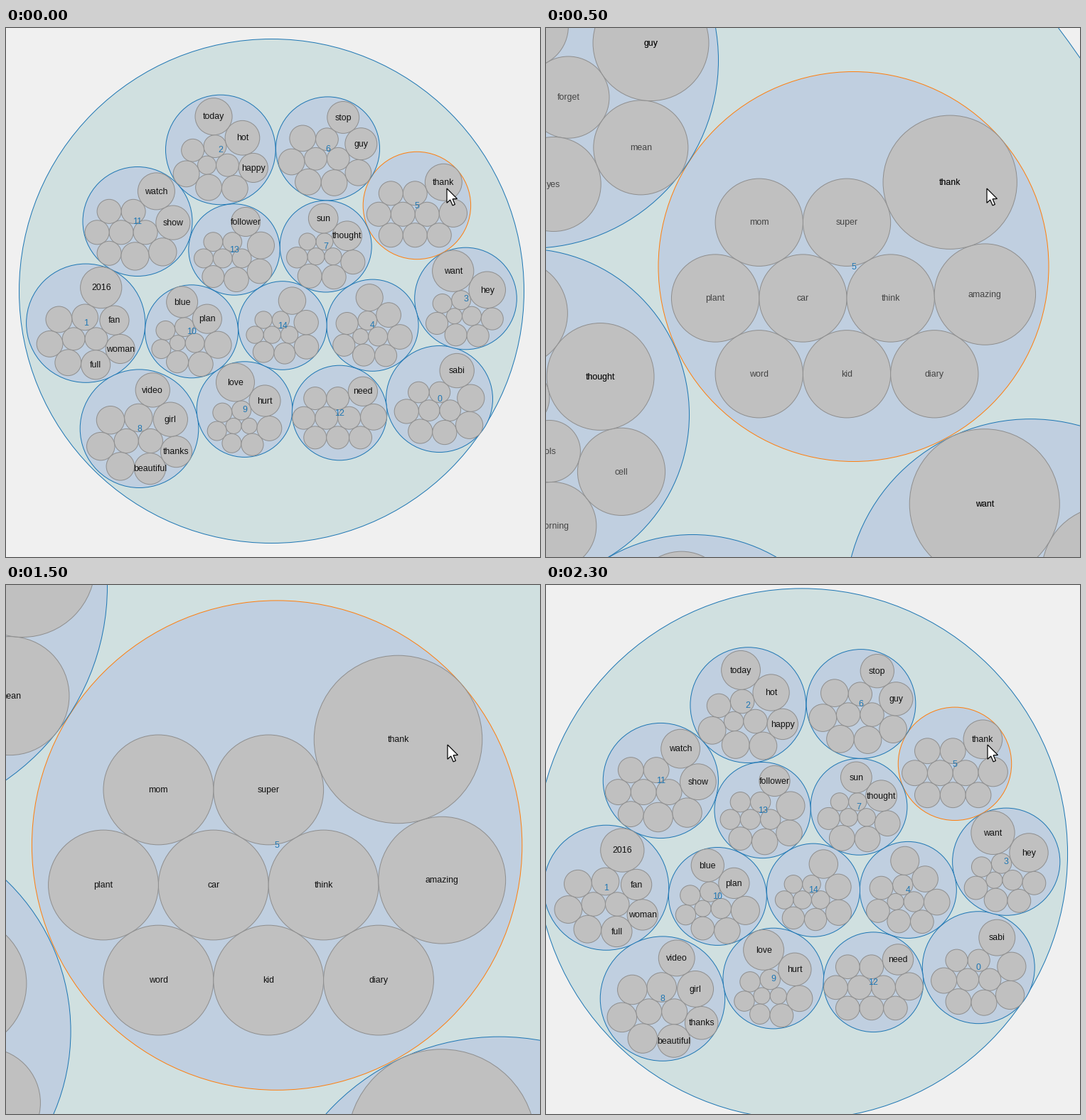
Recreate the animation shown at these times as a matplotlib script. Size 751 by 745 pixels, loop 2500 ms.

```python
import math

import matplotlib.pyplot as plt
from matplotlib.animation import FuncAnimation
from matplotlib.patches import Circle, Polygon

W, H, DPI = 751, 745, 64
PX = 72 / DPI  # points per pixel
BLUE, ORANGE = "#1f77b4", "#ff7f0e"
LABEL_MIN_R = 20
FOCUS = 5


class Leaf:
    def __init__(self, count, word):
        self.r = math.sqrt(count)
        self.word = word
        self.x = self.y = 0.0
        self.next = self.prev = self


def insert(a, b):
    after = a.next
    a.next, b.prev = b, a
    b.next, after.prev = after, b


def splice(a, b):
    a.next, b.prev = b, a


def overlaps(a, b):
    reach = a.r + b.r
    return 0.999 * reach * reach > (b.x - a.x) ** 2 + (b.y - a.y) ** 2


def place(a, b, c):
    """Put c tangent to both a and b."""
    dx, dy = b.x - a.x, b.y - a.y
    dc = dx * dx + dy * dy
    da, db = (b.r + c.r) ** 2, (a.r + c.r) ** 2
    x = 0.5 + (db - da) / (2 * dc)
    area = 2 * da * (db + dc) - (db - dc) ** 2 - da * da
    y = math.sqrt(max(0, area)) / (2 * dc)
    c.x = a.x + x * dx + y * dy
    c.y = a.y + x * dy - y * dx


def find_clash(a, b, c):
    """Look along the front both ways for leaves that c would overlap."""
    j, ahead = b.next, 1
    while j is not b and not overlaps(j, c):
        j, ahead = j.next, ahead + 1
    if j is b:
        return None
    k, back = a.prev, 1
    while k is not j.prev and not overlaps(k, c):
        k, back = k.prev, back + 1
    return j, ahead, k, back


def pack(leaves):
    """Front-chain packing; returns the radius of the group."""
    a, b, c = leaves[:3]
    a.x, b.x = -a.r, b.r
    place(a, b, c)
    insert(a, c)
    insert(c, b)
    b = c
    for leaf in leaves[3:]:
        place(a, b, leaf)
        clash = find_clash(a, b, leaf)
        while clash:
            j, ahead, k, back = clash
            if ahead < back or (ahead == back and b.r < a.r):
                b = j
            else:
                a = k
            splice(a, b)
            place(a, b, leaf)
            clash = find_clash(a, b, leaf)
        insert(a, leaf)
        b = leaf
    cx = (min(n.x - n.r for n in leaves) + max(n.x + n.r for n in leaves)) / 2
    cy = (min(n.y - n.r for n in leaves) + max(n.y + n.r for n in leaves)) / 2
    for n in leaves:
        n.x -= cx
        n.y -= cy
    return max(n.r + math.hypot(n.x, n.y) for n in leaves)


topics = {}


def topic(name, x, y, r, counts, words=""):
    """counts maps a word count to how many words have it; words align right."""
    values = [v for v, times in counts.items() for _ in range(times)]
    words = ["" if w == "-" else w for w in words.split()]
    words = [""] * (len(values) - len(words)) + words
    leaves = [Leaf(v, w) for v, w in zip(values, words)]
    s = r / pack(leaves)
    for n in leaves:
        n.x, n.y, n.r = x + s * n.x, y + s * n.y, s * n.r
    topics[name] = (x, y, r, leaves)


topic(0, 609, 522, 75, {3: 4, 4: 3, 5: 2, 8: 1}, "sabi")
topic(1, 111.7, 415.2, 83.6, {3: 2, 4: 4, 5: 3, 10: 1}, "full woman fan 2016")
topic(2, 301.3, 171, 77.3, {2: 1, 3: 3, 4: 3, 5: 1, 7: 1, 8: 1}, "happy hot today")
topic(3, 646, 380.5, 71.8, {2: 1, 3: 3, 4: 4, 11: 1, 14: 1}, "hey want")
topic(4, 515, 418.2, 64.6, {2: 1, 3: 2, 4: 4, 5: 2, 6: 1})
topic(5, 577.4, 249.5, 75.7, {3: 8, 4: 1, 7: 1},
      "car think super mom plant word kid diary amazing thank")
topic(6, 452, 169.4, 73, {3: 3, 4: 5, 6: 2},
      "forget - - - - yes mean guy stop")
topic(7, 449.2, 307, 64.5, {2: 4, 3: 1, 4: 3, 6: 2},
      "lols - - - - morning cell thought sun")
topic(8, 187, 563.7, 83.3, {3: 2, 4: 4, 5: 2, 6: 2},
      "beautiful thanks girl video")
topic(9, 335, 536.6, 67.3, {2: 2, 3: 4, 4: 1, 5: 1, 8: 1, 12: 1}, "hurt love")
topic(10, 260.5, 426.8, 65.5,
      {2: 1, 3: 4, 4: 1, 5: 1, 6: 1, 7: 1, 8: 1}, "plan blue")
topic(11, 184.5, 272, 77, {3: 6, 4: 2, 6: 1, 7: 1}, "show watch")
topic(12, 468.6, 541.5, 66.8, {3: 8, 4: 1, 5: 1}, "need")
topic(13, 320.5, 311.5, 64.2, {3: 5, 4: 1, 5: 2, 6: 1, 7: 1}, "follower")
topic(14, 388.3, 418.5, 62.3, {2: 5, 3: 2, 4: 2, 5: 1})

ROOT = (373, 370, 355)

# Focus circle on screen (x, y, r), opacity of big-word labels and of all
# labels, pointer tip.
VIEWS = [
    ((577.4, 249.5, 75.7), 1, 0, (619.5, 225.5)),
    ((432, 335.5, 274.5), 1, 0.7, (619.5, 225.5)),
    ((373, 370.2, 355), 0, 1, (620.5, 224.5)),
    ((380.6, 366.1, 344.7), 0, 1, (620.5, 224.5)),
    ((574.5, 251.3, 79.7), 1, 0, (620.5, 224.5)),
]

POINTER = [(0, 0), (0, 16), (3.7, 12.6), (6.4, 18.8), (9, 17.7),
           (6.4, 11.6), (11.4, 11.4)]

fig = plt.figure(figsize=(W / DPI, H / DPI), dpi=DPI, facecolor="#f0f0f0")
ax = fig.add_axes([0, 0, 1, 1])


def disc(x, y, r, fill, edge):
    ax.add_patch(Circle((x, y), r, facecolor=fill, edgecolor=edge, lw=PX))


def label(x, y, text, color, alpha=1):
    if -40 < x < W + 40 and -20 < y < H + 20:
        ax.text(x, y + 3.7, text, color=color, alpha=alpha, ha="center",
                va="baseline", family="Liberation Sans", size=12.4 * PX,
                clip_on=True)


def draw(i):
    (vx, vy, vr), big_alpha, all_alpha, (px, py) = VIEWS[i]
    fx, fy, fr, _ = topics[FOCUS]
    k = vr / fr

    def view(x, y, r):
        return vx + k * (x - fx), vy + k * (y - fy), k * r

    ax.clear()
    ax.axis("off")
    ax.set_xlim(-0.5, W - 0.5)
    ax.set_ylim(H - 0.5, -0.5)

    disc(*view(*ROOT), "#d0e0e0", BLUE)
    for name, (x, y, r, _) in topics.items():
        disc(*view(x, y, r), "#c0cfe0", ORANGE if name == FOCUS else BLUE)
    for *_, leaves in topics.values():
        for n in leaves:
            disc(*view(n.x, n.y, n.r), "#c0c0c0", "#8f8f8f")

    for name, (x, y, r, leaves) in topics.items():
        for n in leaves:
            nx, ny, _ = view(n.x, n.y, n.r)
            if n.word and big_alpha and n.r > LABEL_MIN_R:
                label(nx, ny, n.word, "#111111", big_alpha)
            if n.word and all_alpha:
                label(nx, ny, n.word, "#111111", all_alpha)
        label(*view(x, y, r)[:2], str(name), BLUE)

    tip = [(px + 1.27 * x, py + 1.27 * y) for x, y in POINTER]
    ax.add_patch(Polygon(tip, facecolor="white", edgecolor="black",
                         lw=1.2 * PX, joinstyle="miter", zorder=10))
    return []


anim = FuncAnimation(fig, draw, frames=len(VIEWS), interval=500,
                     repeat=True, repeat_delay=0)
plt.show()
```
